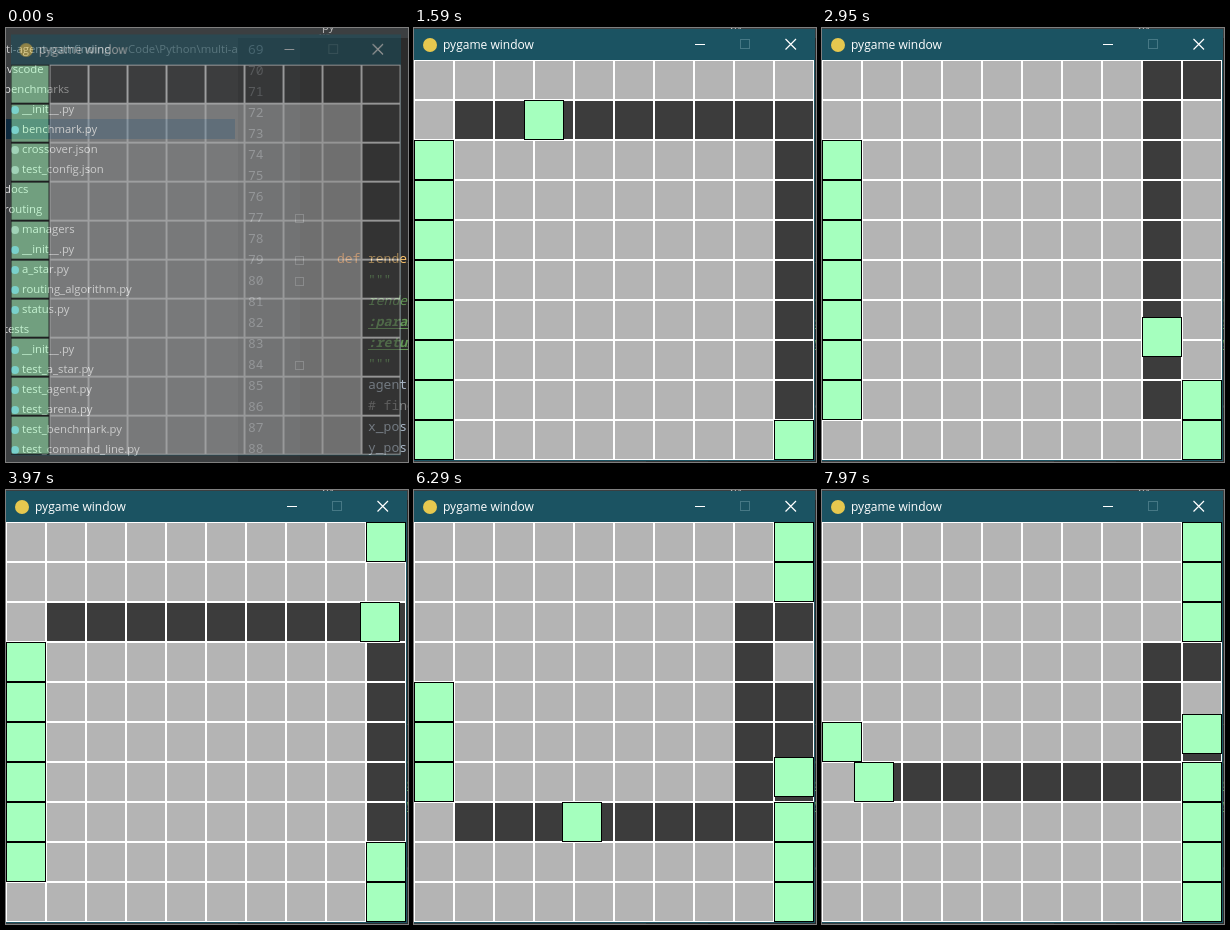
These frames come from a looping animation (402x434 px, 8 s). An HTML page with a canvas:

```html
<!DOCTYPE html>
<html lang="en">
<head>
<meta charset="utf-8">
<title>pygame window</title>
<style>
html, body { margin: 0; width: 100%; height: 100%; overflow: hidden; background: #2b2b2b; }
canvas { display: block; }
</style>
</head>
<body>
<canvas id="stage" width="402" height="434"></canvas>
<script>
const ctx = document.getElementById('stage').getContext('2d');
const LOOP = 8000, CELL = 40, TOP = 32, COUNT = 10, LAST = COUNT - 1;
const MS_PER_PIXEL = 1.376;
const TITLE = '12px "Open Sans", sans-serif';
const LABEL = '11.3px "Open Sans", sans-serif';
const MONO = '13px "Noto Sans Mono", monospace';

// Start rows in walking order, with the time at which each agent sets off.
const order = [0, 1, 9, 2, 8, 3, 7, 4, 6, 5];
const launches = [200, 1440, 1983, 3429, 4088, 5380, 5885, 7080, 7882, LOOP];

// Upper rows use the last column, lower rows climb the one before it.
function makeAgent(row, index) {
  const goal = LAST - row, upper = row < COUNT / 2;
  const lane = upper ? LAST : LAST - 1;
  const corners = [[0, row], [lane, row], [lane, goal]];
  if (!upper) corners.push([LAST, goal]);
  const total = (LAST + Math.abs(goal - row)) * CELL;
  // Distance at which the way is free for the next agent.
  const handover = row === 0 ? total : upper ? LAST * CELL : total - CELL;
  return { corners, total, handover, launch: launches[index], next: launches[index + 1] ?? LOOP };
}

// Two agents walking together move at half speed; each waits at its handover for the next launch.
function addWalks(agents) {
  let previousTail = 0;
  for (const agent of agents) {
    const { total, handover, launch, next } = agent;
    const shared = previousTail;
    const walk = t => {
      const pixels = Math.max(0, t - launch) / MS_PER_PIXEL;
      return Math.min(handover, pixels < 2 * shared ? pixels / 2 : pixels - shared);
    };
    const atNext = walk(next);
    agent.distance = t => t < next ? walk(t)
      : Math.min(total, atNext + (t - next) / MS_PER_PIXEL / 2);
    previousTail = total - atNext;
  }
  return agents;
}

const agents = addWalks(order.map(makeAgent));

// Position of an agent and the cells of the legs it still has to finish.
function agentState({ corners, launch, distance }, t) {
  let left = Math.round(distance(t)), position = null;
  const reserved = [];
  for (let i = 1; i < corners.length; i++) {
    const [x0, y0] = corners[i - 1], [x1, y1] = corners[i];
    const steps = Math.abs(x1 - x0) + Math.abs(y1 - y0);
    const dx = Math.sign(x1 - x0), dy = Math.sign(y1 - y0);
    if (!position && left >= steps * CELL) {
      left -= steps * CELL;
      continue;
    }
    position = position || [x0 * CELL + dx * left, y0 * CELL + dy * left];
    for (let s = 1; s <= steps; s++) reserved.push([x0 + dx * s, y0 + dy * s]);
  }
  return {
    position: position || corners[corners.length - 1].map(v => v * CELL),
    reserved: t >= launch || launch === launches[0] ? reserved : []
  };
}

function rect(color, x, y, w, h) {
  ctx.fillStyle = color;
  ctx.fillRect(x, y, w, h);
}

function tile(x, y, border, fill) {
  rect(border, x, y + TOP, CELL, CELL);
  rect(fill, x + 1, y + TOP + 1, CELL - 2, CELL - 2);
}

function text(value, x, y, color, font) {
  ctx.font = font;
  ctx.fillStyle = color;
  ctx.fillText(value, x, y);
}

function dot(color, x, y, radius) {
  ctx.fillStyle = color;
  ctx.beginPath();
  ctx.arc(x, y, radius, 0, Math.PI * 2);
  ctx.fill();
}

const tree = `.vscode
benchmarks
  __init__.py
  benchmark.py
  crossover.json
  test_config.json
docs
routing
  managers
  __init__.py
  a_star.py
  routing_algorithm.py
  status.py
tests
  __init__.py
  test_a_star.py
  test_agent.py
  test_arena.py
  test_benchmark.py
  test_command_line.py`.split('\n');

const code = [
  ['render', '#ffc66d', ''],
  ['"""', '#629755', ''],
  ['render', '#629755', 'italic '],
  [':param', '#629755', 'bold italic '],
  [':return', '#629755', 'bold italic '],
  ['"""', '#629755', ''],
  ['agent', '#a9b7c6', ''],
  ['# find', '#808080', ''],
  ['x_pos', '#a9b7c6', ''],
  ['y_pos', '#a9b7c6', '']
];

function drawEditor() {
  rect('#3c3f41', 0, 0, 402, 434);
  rect('#313335', 232, 10, 62, 424);
  rect('#2b2b2b', 294, 10, 108, 424);
  rect('#0d293e', 0, 91, 229, 20);
  text('ti-agent-pathfinding', 0, 25, '#ccc', LABEL);
  text('Code\\Python\\multi-a', 122, 25, '#999', LABEL);
  text('py', 316, 2, '#bbb', LABEL);

  tree.forEach((name, i) => {
    const y = 41 + i * 20, child = name.startsWith(' ');
    text(name.trim(), child ? 16 : -2, y + 4, '#e4e4e4', LABEL);
    if (child) dot(name.endsWith('.py') ? '#4fa3d8' : '#9aa7b0', 9, y + 1, 4);
  });

  for (let i = 0; i < 20; i++) text(69 + i, 242, 26 + i * 21, '#74787c', MONO);
  ctx.lineWidth = 1;
  ctx.strokeStyle = '#606264';
  for (const line of [8, 10, 11, 15]) ctx.strokeRect(289.5, 18.5 + line * 21, 8, 8);

  text('def', 331, 235, '#cc7832', MONO);
  code.forEach(([word, color, style], i) => {
    const y = 235 + i * 21;
    text(word, 362, y, color, style + MONO);
    if (style.startsWith('bold')) rect(color, 362, y + 2, 40, 1);
  });
}

function drawTitleBar() {
  rect('#1b5362', 0, 1, 401, 432);
  dot('#e6c84f', 16, 17, 7);
  text('pygame window', 29, 21, '#fff', TITLE);
  rect('#fff', 281, 16, 10, 1);
  ctx.lineWidth = 1;
  ctx.strokeStyle = '#467885';
  ctx.strokeRect(326.5, 11.5, 9, 9);
  ctx.lineWidth = 1.2;
  ctx.strokeStyle = '#fff';
  ctx.beginPath();
  ctx.moveTo(371.5, 11);
  ctx.lineTo(382, 21.5);
  ctx.moveTo(382, 11);
  ctx.lineTo(371.5, 21.5);
  ctx.stroke();
}

function drawArena(t) {
  for (let i = 0; i < COUNT * COUNT; i++) {
    tile(i % COUNT * CELL, Math.floor(i / COUNT) * CELL, '#fff', '#b4b4b4');
  }
  const states = agents.map(agent => agentState(agent, t));
  for (const { reserved } of states) {
    for (const [x, y] of reserved) tile(x * CELL, y * CELL, '#fff', '#3c3c3c');
  }
  for (const { position: [x, y] } of states) tile(x, y, '#000', '#a5ffbe');
}

const editorLayer = document.createElement('canvas');
const windowLayer = document.createElement('canvas');

function snapshot(layer) {
  layer.width = 402;
  layer.height = 434;
  layer.getContext('2d').drawImage(ctx.canvas, 0, 0);
}

function draw(t) {
  const opening = Math.min(1, Math.max(0, t - 20) / 180);
  drawEditor();
  if (opening < 1) snapshot(editorLayer);
  drawTitleBar();
  drawArena(t);
  if (opening === 1) return;

  // While opening, the finished window is scaled and blended over the editor.
  snapshot(windowLayer);
  const eased = 1 - (1 - opening) ** 2;
  const scale = 0.975 + 0.025 * eased;
  ctx.drawImage(editorLayer, 0, 0);
  ctx.save();
  ctx.globalAlpha = 0.5 + 0.5 * eased;
  ctx.translate(200, 217);
  ctx.scale(scale, scale);
  ctx.drawImage(windowLayer, 0, 1, 401, 432, -200.5, -216, 401, 432);
  ctx.restore();
}

const start = performance.now();
function frame() {
  draw((performance.now() - start) % LOOP);
  requestAnimationFrame(frame);
}
frame();
</script>
</body>
</html>
```
